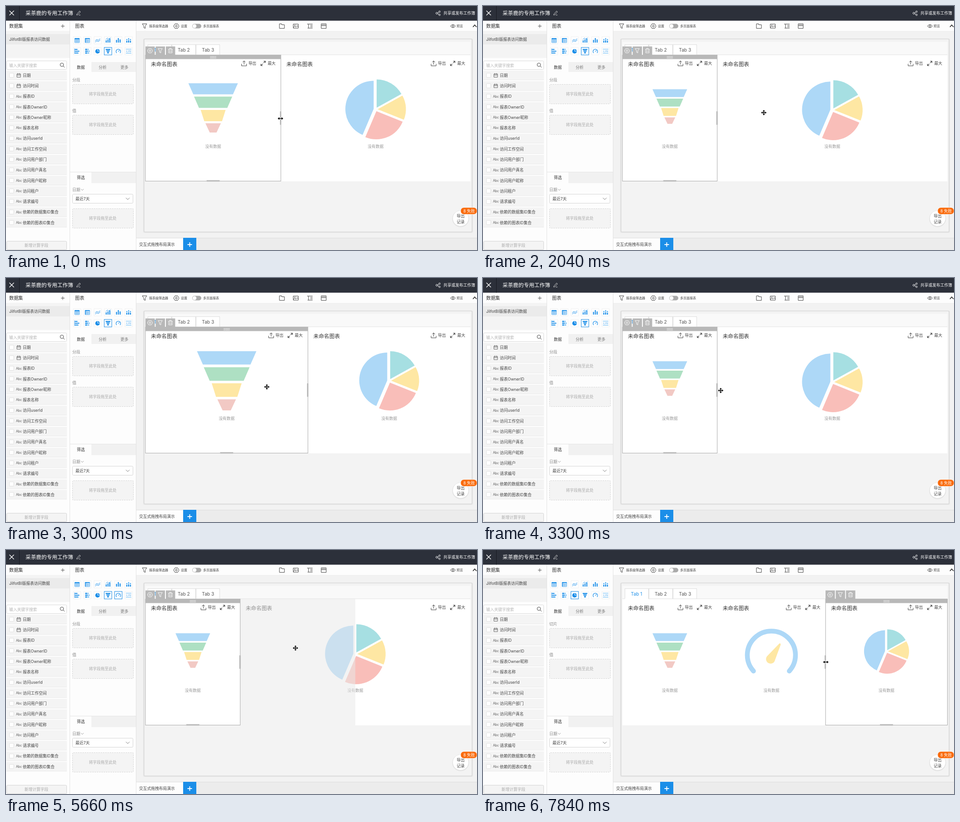
An HTML page that plays this animation: 1037x540 px, repeating every 7990 ms.

```html
<!DOCTYPE html>
<html lang="zh">
<head>
<meta charset="utf-8">
<title>交互式拖拽布局演示</title>
<style>
html, body { margin: 0; height: 100%; overflow: hidden; background: #f2f2f2; }
svg { display: block; width: 100vw; height: 100vh; font-family: Inter, "Noto Sans CJK SC", "Noto Sans CJK", sans-serif; }
text { white-space: pre; }
</style>
</head>
<body>
<svg id="stage" viewBox="0 0 1037 540"><g id="base"></g><g id="live"></g></svg>
<script>
const LOOP = 7990, BLUE = '#1b8ee8', INK = '#444', GREY = '#b8b8b8';
const LEFT = 307, RIGHT = 1022.5, COL = (RIGHT - LEFT) / 24;
const SMALL = 8.75, MID = 10.2, BIG = 11.66, TINY = 7;

// Drawing helpers; text is placed by its vertical centre.
const rect = (x0, y0, x1, y1, fill, more = '') =>
  `<rect x="${x0}" y="${y0}" width="${x1 - x0}" height="${y1 - y0}" fill="${fill}" ${more}/>`;
const frame = (x0, y0, x1, y1, stroke, fill = 'none', more = '') =>
  rect(x0 + .5, y0 + .5, x1 - .5, y1 - .5, fill, `stroke="${stroke}" ${more}`);
const text = (x, y, s, size = SMALL, fill = INK, more = '') =>
  `<text x="${x}" y="${y + size * .37}" font-size="${size}" fill="${fill}" ${more}>${s}</text>`;
const centred = (x, y, s, size, fill) => text(x, y, s, size, fill, 'text-anchor="middle"');
const line = (d, stroke = INK, width = 1, more = '') =>
  `<path d="${d}" fill="none" stroke="${stroke}" stroke-width="${width}" ${more}/>`;
const shape = (d, fill) => `<path d="${d}" fill="${fill}"/>`;
const circle = (x, y, r, fill, more = '') => `<circle cx="${x}" cy="${y}" r="${r}" fill="${fill}" ${more}/>`;
const at = (x, y, s, scale = 1) => `<g transform="translate(${x} ${y}) scale(${scale})">${s}</g>`;
const polar = (r, deg) => {
  const a = deg * Math.PI / 180;
  return [r * Math.sin(a), -r * Math.cos(a)].map(v => v.toFixed(2));
};

const filterIcon = c => line('M-5-5H5L1.5 0V5L-1.5 3.5V0Z', c);
const gearIcon = c => line('M-3-5H3L6 0L3 5H-3L-6 0Z', c, 1, 'stroke-linejoin="round"') +
  circle(0, 0, 2, 'none', `stroke="${c}"`);
const trashIcon = c => line('M-5-3.5H5M-2-3.5V-5.5H2V-3.5M-4-3.5V5H4V-3.5M-1.5-1V3M1.5-1V3', c);
const calendarIcon = line('M-4-3H4V4H-4ZM-4-.5H4M-2-5V-2M2-5V-2', '#555', .9);
const exportIcon = line('M-5.5 1V5.5H5.5V1M0 2.5V-5.5M-3.2-2.5L0-5.5L3.2-2.5');
const expandIcon = line('M1-5H5V-1M5-5L1-1M-1 5H-5V1M-5 5L-1 1', INK, 1.1);

const chartIcons = [
  line('M-5-4.5H5V5H-5ZM-5 2H5M-1.7-2V5M1.7-2V5M-5-1H5', BLUE, .8) + rect(-5, -5, 5, -2.5, BLUE),
  line('M-5-4.5H5V5H-5ZM-5 2H5M1-2V5M-5-1H5', BLUE, .8) + rect(-5, -5, 5, -3, BLUE) + rect(-5, -5, -2, 5, BLUE, 'opacity=".5"'),
  line('M-5.5 1L-2-2L1.5 0L5.5-4M-5.5 4L-2 1L1.5 3L5.5-1', BLUE),
  line('M-4 5V0M0 5V-2M4 5V-4', BLUE, 2.2) + line('M-5-2L-1-5L2-3L5.5-6', BLUE, .9),
  line('M-4 5V-1M0 5V-5M4 5V-2', BLUE, 2.2),
  line('M-4 5V1M0 5V0M4 5V1', BLUE, 2.4) + line('M-4 0V-3M0-1V-5M4 0V-3', '#62b5f3', 2.4),
  line('M-5-4H1M-5 0H5M-5 4H3', BLUE, 2.2) + line('M-5.5-6V6', BLUE, .8),
  line('M-5-4H0M-5 0H1M-5 4H0', BLUE, 2.4) + line('M1-4H3M2 0H5M1 4H4', '#62b5f3', 2.4),
  circle(-.3, .3, 5, BLUE) + line('M0-5.5V0H5.5', '#fff', .9),
  shape('M-5.5-5H5.5L4.6-2.6H-4.6ZM-4-1.5H4L3 1H-3ZM-2.4 2H2.4L1.5 5H-1.5Z', BLUE),
  line('M-3.6 4A5 5 0 1 1 3.6 4M0 1L2.4-2', BLUE, 1.2),
  centred(0, 0, '2,312', 4.6, BLUE) + line('M-6-4.5H6M-6 4.5H6', '#62b5f3', 1)
];
const iconPos = i => [156.5 + i % 6 * 22.7, i < 6 ? 76 : 100];

function drawHeader() {
  return rect(0, 0, 1037, 32.5, '#2c303a') + rect(29, 0, 30, 32.5, '#171a21') +
    line('M7.5 10.5L17.5 20.5M17.5 10.5L7.5 20.5', '#fff', 1.4) +
    text(43, 16, '采茶鹿的专用工作簿', BIG, '#fff') +
    line('M156 18L162 11L164 13L158 19.5L155.5 20ZM160 20H164', '#ddd', .9) +
    line('M954 13L949 16L954 19', '#fff', .9) +
    circle(948.5, 16, 2, '#2c303a', 'stroke="#fff"') +
    circle(954.5, 12.5, 1.7, '#2c303a', 'stroke="#fff"') + circle(954.5, 19.5, 1.7, '#2c303a', 'stroke="#fff"') +
    text(963, 16, '共享或发布工作簿', SMALL, '#fff');
}

function drawFields() {
  const names = ['日期', '访问时间', '报表ID', '报表OwnerID', '报表Owner昵称', '报表名称', '访问userId', '访问工作空间',
    '访问用户部门', '访问用户真名', '访问用户昵称', '访问租户', '请求编号', '依赖的数据集ID集合', '依赖的图表ID集合'];
  const rows = names.map((name, i) => {
    const y = 153.5 + i * 23.28;
    return rect(1, y - 10.3, 134, y + 10.5, '#f4f4f4', 'rx="1"') + rect(1, y + 9.7, 134, y + 10.5, '#e8e8e8') +
      rect(7.5, y - 5, 17, y + 4.5, '#fff', 'stroke="#d9d9d9" stroke-width=".8" rx="1"') +
      (i < 2 ? at(28, y, calendarIcon) : text(22, y, 'Abc', 7, '#555')) + text(37, y, name);
  });
  return rect(0, 32, 140, 540, '#fdfdfd') + rect(0, 55, 140, 115, '#f4f4f4') + rect(0, 62, 140, 85, '#ebebeb') +
    text(7, 44.5, '数据集', MID, '#333') + line('M121 44.5H129M125 40.5V48.5', '#555') +
    text(7, 73.5, 'JilfotBI版报表访问数据') +
    frame(1, 121, 134, 141, '#d9d9d9', '#fff', 'rx="2"') + text(7, 131.5, '输入关键字搜索', SMALL, '#b5b5b5') +
    circle(123, 130, 3.8, 'none', `stroke="${INK}"`) + line('M126 133L129 136') + rows.join('') +
    frame(1, 520, 134, 540, '#d4d4d4', '#f4f4f4', 'rx="2"') + centred(67, 530, '新增计算字段', SMALL, '#aaa') +
    rect(140, 32, 141, 540, '#e2e2e2');
}

const dropZone = y => frame(146, y, 281, y + 44, '#d4d4d4', '#f4f4f4', 'stroke-dasharray="3 2" rx="2"') +
  centred(213, y + 22, '将字段拖至此处', SMALL, '#aaa');

function drawChartPanel() {
  const icons = chartIcons.map((icon, i) => at(...iconPos(i), rect(-8, -8, 8, 8, '#fff', 'stroke="#f0f0f0"') + icon));
  return rect(141, 32, 286, 540, '#fdfdfd') + text(152, 44.5, '图表', MID, '#333') + icons.join('') +
    rect(141, 124, 286, 146, '#f1f1f1') + rect(141, 124, 188, 147, '#fdfdfd') +
    text(156, 135.5, '数据', SMALL, '#333') + text(204, 135.5, '分析', SMALL, '#777') + text(252, 135.5, '更多', SMALL, '#777') +
    text(146, 232, '值', SMALL, '#888') + dropZone(173) + dropZone(241) +
    rect(141, 367, 286, 392, '#f1f1f1') + rect(141, 367, 286, 368, '#e4e4e4') + rect(141, 368, 188, 392, '#fdfdfd') +
    text(156, 380, '筛选', SMALL, '#333') + text(146, 406.5, '日期', SMALL, '#888') + line('M165 405L168 408L171 405', '#999', .9) +
    frame(146, 416, 280, 437, '#d4d4d4', '#fff', 'rx="2"') + text(153, 426.5, '最近7天') + line('M264 424.5L268 428.5L272 424.5', '#777') +
    dropZone(448) + rect(286, 32, 287, 540, '#e2e2e2');
}

function drawWorkspace() {
  const bar = rect(287, 32, 1037, 56, '#fdfdfd') + rect(287, 55.5, 1037, 56.5, '#ececec') +
    at(305, 44.5, filterIcon(INK)) + text(315, 44.5, '报表级筛选器', TINY) +
    at(375, 44.5, gearIcon(INK)) + text(385, 44.5, '设置', TINY) +
    rect(410, 39.5, 430, 49.5, '#aaa', 'rx="5"') + circle(415, 44.5, 4.3, '#fff') + text(434, 44.5, '多页面报表', TINY) +
    at(607.5, 44.5, line('M-5.5 5V-5H-.5V-3H5.5V5Z')) +
    at(638, 44.5, line('M-5.5-4.5H5.5V4.5H-5.5ZM-5 3L-2-.5L0 2L3-1L5.5 2') + circle(-2, -2, 1, INK)) +
    at(669, 44.5, line('M-6-4.5H6M-3-4.5V4.5M-5 4.5H6M1-1.5H6M1 1.5H6')) +
    at(699.5, 44.5, line('M-5.5-5H5.5V5H-5.5ZM-5.5-1H5.5') + line('M-4-3H5', INK, 1.2, 'stroke-dasharray="2 1"')) +
    line('M978.5 44.5Q984 37.5 989.5 44.5Q984 51.5 978.5 44.5Z') + circle(984, 44.5, 1.8, 'none', `stroke="${INK}"`) +
    text(992, 44.5, '预览', TINY) + line('M1028 46.5L1032 42L1036 46.5', '#222', 1.5);
  const tabs = [1, 2, 3].map((n, i) => frame(312 + i * 53, 85, 365 + i * 53, 109, '#ddd', '#fff') +
    centred(338 + i * 53.4, 97.5, 'Tab ' + n, MID, i ? '#555' : BLUE));
  return rect(287, 32, 1037, 540, '#f2f2f2') + bar +
    rect(302, 72, 1028, 502, '#e6e6e6', 'rx="3"') + frame(303.5, 72.5, 1026.5, 500.5, '#d2d2d2', '#f3f3f3', 'rx="2"') +
    rect(LEFT, 79, RIGHT, 108, '#f9f9f9') + tabs.join('') + rect(LEFT, 107.5, RIGHT, 108.5, '#ddd') +
    rect(LEFT, 108.5, RIGHT, 388, '#fff') + rect(312.5, 107, 364, 109, '#fff') +
    rect(287, 513, 1037, 540, '#ececec') + rect(287, 513, 390, 540, '#fdfdfd') + rect(287, 513, 1037, 514, '#ddd') +
    text(293, 528, '交互式拖拽布局演示') + rect(390, 513, 419, 540, BLUE) +
    line('M399.5 528H409.5M404.5 523V533', '#fff', 1.8) +
    circle(1001, 471, 18.5, '#e3e3e3') + circle(1001, 470, 17.5, '#fff', 'stroke="#ddd" stroke-width=".7"') +
    centred(1001, 465, '导出') + centred(1001, 477.5, '记录') +
    rect(1001, 446, 1037, 461, '#f96a0b', 'rx="7" stroke="#fff" stroke-width=".7"') + text(1007, 453.5, '8 失败', SMALL, '#fff');
}

// Chart placeholders, drawn around their own centre.
const figures = {
  funnel(cols) {
    const colours = ['#add8f7', '#aee0c3', '#fee7a3', '#f2c9c4'];
    const bands = [[65.5, 52.5, 0, 29.5], [50.5, 37.5, 35.5, 65.5], [33, 23.5, 71, 101], [20.5, 9, 106.5, 131]];
    const s = bands.map(([a, b, y0, y1], i) =>
      shape(`M${-a} ${y0 - 65.5}H${a}L${b} ${y1 - 65.5}H${-b}Z`, colours[i])).join('');
    return at(0, 0, s, Math.min(cols * 10.9, 133) / 131);
  },
  // Every slice is pushed outwards along its middle angle.
  pie(cols) {
    const cuts = [0, 61, 112, 203, 360], colours = ['#a6dfe2', '#fee7a3', '#f9beb9', '#add8f7'];
    const size = Math.min(cols * 11, 133.5), push = size * .033, r = size / 2 - push;
    return colours.map((c, i) => {
      const from = cuts[i], to = cuts[i + 1];
      return at(...polar(push, (from + to) / 2),
        shape(`M0 0L${polar(r, from)}A${r} ${r} 0 0 1 ${polar(r, to)}Z`, c));
    }).join('');
  },
  gauge(cols) {
    return at(0, 9, line(`M${polar(53, -132)}A53 53 0 1 1 ${polar(53, 132)}`, '#add8f7', 10.5, 'stroke-linecap="round"') +
      shape('M17.5-25.5Q20.5-27 20.5-23L8 11A10 10 0 1 1-9 2Z', '#fee7a3'), cols / 8);
  }
};

function chart(kind, from, to) {
  const x0 = LEFT + from * COL, x1 = LEFT + to * COL, cx = (x0 + x1) / 2, cols = to - from;
  const cy = 215.5 + Math.min(cols, 12) + Math.max(cols - 12, 0) * .6;
  return text(x0 + 12, 129, '未命名图表', BIG, '#333') +
    at(x1 - 81, 127, exportIcon) + text(x1 - 71.5, 127, '导出') +
    at(x1 - 39, 127, expandIcon) + text(x1 - 29, 127, '最大') +
    at(cx, cy, figures[kind](cols)) + centred(cx, 310.5, '没有数据', SMALL, '#999');
}

function selection(from, to) {
  const x0 = LEFT + from * COL, x1 = LEFT + to * COL, cx = (x0 + x1) / 2;
  const side = to < 24 ? x1 : x0;
  const tools = [gearIcon, filterIcon, trashIcon].map((icon, i) =>
    rect(x0 + i * 22.5, 89.5, x0 + i * 22.5 + 20.5, 108, GREY) + at(x0 + 10 + i * 22.5, 99, icon('#fff'), .95));
  return rect(x0, 108.5, x1, 387.5, 'none', 'stroke="#aaa" stroke-width="1"') + rect(x0, 108, x1, 117.5, GREY) +
    line(`M${cx - 6.5} 112H${cx + 6.5}M${cx - 6.5} 115H${cx + 6.5}`, '#eee', 1.3, 'stroke-dasharray="1.6 .7"') +
    rect(cx - 14.5, 385.5, cx + 14.5, 388.5, GREY, 'rx="1"') + rect(side - 2, 233, side + 1, 263, GREY, 'rx="1"') + tools.join('');
}

const resizeArrow = 'M-6 0L-2.5-3V-.8H2.5V-3L6 0L2.5 3V.8H-2.5V3Z';
const moveArrow = 'M0-6L2.5-3H.8V-.8H3V-2.5L6 0L3 2.5V.8H.8V3H2.5L0 6L-2.5 3H-.8V.8H-3V2.5L-6 0L-3-2.5V-.8H-.8V-3H-2.5Z';
const cursor = (x, y, d) => at(x + .3, y, line(d, '#fff', 1.6) + shape(d, '#000'));

// Time, cursor x, cursor y, columns taken by the first chart (kept when absent).
const steps = [
  [0, 604, 249, 10], [300, 601, 249], [450, 592, 249], [600, 576, 250], [750, 545, 250, 9], [990, 508, 250, 8],
  [1140, 490, 250, 7], [1290, 484, 250, 6],
  [1890, 530, 242], [2040, 618, 236, 7], [2190, 730, 238, 12], [2340, 815, 242, 16], [2520, 846, 246, 18],
  [2820, 760, 243, 17], [3000, 574, 241, 12], [3150, 510, 247, 9], [3300, 523, 249, 7], [3450, 480, 225],
  [3590, 375, 172], [3740, 264, 128],
  [3890, 259, 119], [4040, 252, 108], [4190, 248, 102], [4340, 247, 100],
  [4780, 252, 109], [4930, 360, 160], [5080, 500, 205], [5210, 590, 222], [5360, 630, 219],
  [5660, 637, 217], [6110, 650, 219], [6230, 690, 226], [6380, 750, 234], [6530, 806, 238],
  [6740, 845, 240], [6890, 850, 241], [7040, 838, 242], [7190, 812, 244], [7340, 785, 247], [7540, 765, 248], [7690, 757, 248],
  [7840, 754.5, 248]
];
const GAUGE_PRESSED = 4040, GAUGE_DROPPED = 5960, PIE_SELECTED = 6890;

function scene(t) {
  const past = steps.filter(s => s[0] <= t), [, x, y] = past.at(-1);
  const cols = past.filter(s => s[3]).at(-1)[3];
  const dropped = t >= GAUGE_DROPPED, pieSelected = t >= PIE_SELECTED;
  const resizing = t < 1890 || t >= 2520 && t < 2820 || t >= 7690;
  const active = pieSelected ? [8] : dropped ? [10] : t >= GAUGE_PRESSED ? [9, 10] : [9];
  let s = active.map(i => at(...iconPos(i), rect(-8.3, -8.3, 8.3, 8.3, 'none', `stroke="${BLUE}"`))).join('');
  s += text(146, 163.5, pieSelected ? '切片' : dropped ? '指标' : '分段', SMALL, '#888');
  s += chart('funnel', 0, cols);
  if (dropped) {
    s += chart('gauge', 7, 15) + chart('pie', 15, 24) + (pieSelected ? selection(15, 24) : selection(7, 15));
  } else {
    s += chart('pie', cols, 24);
    if (t >= 5210) s += rect(LEFT + 7 * COL, 108.5, LEFT + 15.5 * COL, 388, '#e8e8e8', 'opacity=".52"');
    s += selection(0, cols);
  }
  return s + cursor(x, y, resizing ? resizeArrow : moveArrow);
}

document.getElementById('base').innerHTML = drawWorkspace() + drawFields() + drawChartPanel() + drawHeader();
const live = document.getElementById('live');
const start = performance.now();
let shown = '';
function draw() {
  const next = scene((performance.now() - start) % LOOP);
  if (next !== shown) live.innerHTML = shown = next;
  requestAnimationFrame(draw);
}
draw();
</script>
</body>
</html>
```
